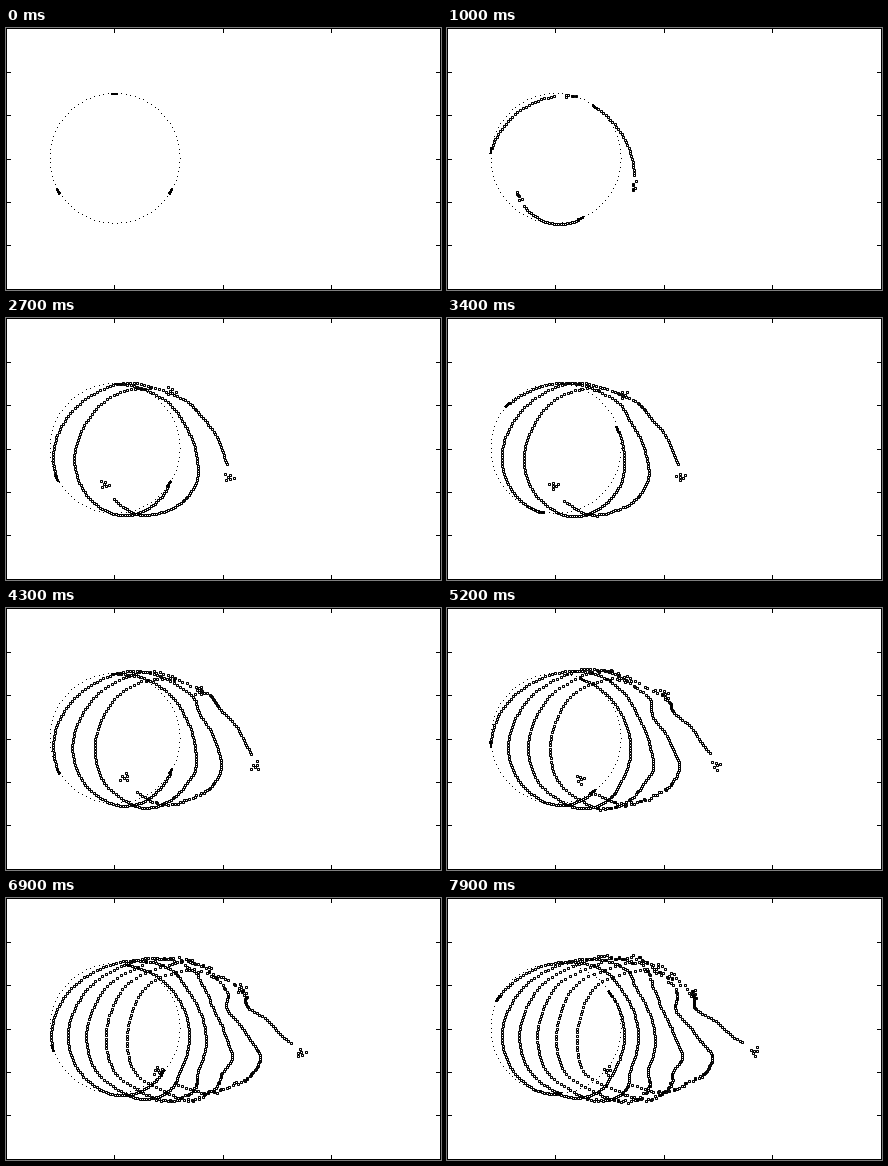
A matplotlib script that plays this animation: 435x262 px, repeating every 8 s.

```python
import numpy as np
import matplotlib.pyplot as plt
from matplotlib.animation import FuncAnimation

W, H, DPI = 435, 262, 80
PX = 72 / DPI                       # one pixel in points
CX, CY, R = 108.5, 130.8, 65
STEP = 2.5                          # degrees of rotation per solver step
FRAMES = 80
STARTS = np.array([330, 90, 210])

# rotor angle reached at a few moments of the loop
KEY_T = [0, 9, 19, 27, 34, 45, 52, 60, 69, 79]
KEY_DEG = [0, 75, 157, 237, 288, 376, 454, 516, 587, 663]
steps = np.rint(np.interp(np.arange(FRAMES), KEY_T, KEY_DEG) / STEP).astype(int)
N = steps[-1]


def bell(v, mid, width):
    return np.exp(-((v - mid) / width) ** 2)


def on_circle(deg):
    a = np.radians(deg)
    return R * np.cos(a), R * np.sin(a)


def velocity(x, y, t):
    """Wake velocity in pixels per degree of rotation."""
    gap = 56 + 0.228 * t - 0.00002 * t * t - x      # distance behind the front
    core = 1 / (1 + np.exp((np.abs(y) - 52) / 5))
    slow = 0.055 * (1 - np.exp(-t / 150))
    slow = slow + 1.1e-7 * t * t * np.clip((x + 65) / 110, 0, 1)
    slow = slow * core * np.clip((gap + 60) / 90, 0, 1)
    slow = slow + 0.025 * bell(x, -62, 10) * bell(y, -5, 35)
    low = bell(gap, 0, 25) * bell(y, -33, 20)
    high = bell(gap, 50, 30) * bell(y, 48, 15)
    hook = bell(gap, 45, 25) * (0.045 * bell(y, -36, 22) - 0.02 * bell(y, 28, 15))
    u = 0.228 - 0.00004 * t - slow + 0.04 * low + 0.05 * high + hook
    v = (0.035 * y / R * bell(x, -10, 60)
         - 0.045 * bell(gap, 45, 45) * (y + 20) / 60
         + 0.015 * low)
    return u, v


rng = np.random.default_rng(4)
shed = np.arange(N)
angle = STARTS[:, None] + STEP * shed
sin0 = np.sin(np.radians(angle))
edge = np.clip((np.abs(sin0) - 0.75) / 0.2, 0, 1) * np.where(sin0 > 0, 2.8, 2)
edge = edge * rng.uniform(0.2, 1, (3, N))
phase = rng.uniform(0, 2 * np.pi, (3, N))


def rolled_up(x, y, n):
    """Scatter the old vortices of the edges and curl up the starting ones."""
    x, y = x[:, :n].copy(), y[:, :n].copy()
    age = STEP * (n - shed[:n])
    amp = edge[:, :n] * np.clip((age - 150) / 200, 0, 1)
    turn = phase[:, :n] + 0.02 * age
    x += amp * np.cos(turn)
    y += amp * np.sin(turn)
    k = min(6, n)
    if k:
        mix = np.clip(age[:k] / 200, 0, 1)
        j = shed[:k]
        rad = 1 + 0.9 * j
        curl = 2.4 * j + 0.012 * STEP * n
        x[:, :k] += mix * (x[:, :1] + rad * np.cos(curl) - x[:, :k])
        y[:, :k] += mix * (y[:, :1] + rad * np.sin(curl) - y[:, :k])
    return CX + x.ravel(), CY - y.ravel()


def solve():
    x, y = on_circle(angle)
    wake = []
    for n in range(N + 1):
        wake.append(rolled_up(x, y, n))
        if n < N:
            u, v = velocity(x[:, :n + 1], y[:, :n + 1], STEP * n)
            x[:, :n + 1] += STEP * u
            y[:, :n + 1] += STEP * v
    return wake


wake = solve()

fig = plt.figure(figsize=(W / DPI, H / DPI), dpi=DPI, facecolor="white")
ax = fig.add_axes([0, 0, 1, 1])
ax.set_xlim(0, W)
ax.set_ylim(H, 0)
ax.axis("off")


def line(xs, ys, width=1):
    return ax.plot(xs, ys, color="black", lw=width * PX, antialiased=False,
                   snap=False, solid_capstyle="butt",
                   solid_joinstyle="miter")[0]


for ey in (0.5, H - 0.5):
    line([0, W], [ey, ey])
for ex in (0.5, W - 0.5):
    line([ex, ex], [0, H])
for tx in (108.5, 217.5, 325.5):
    line([tx, tx], [0, 5])
    line([tx, tx], [H - 5, H])
for ty in (44.5, 87.5, 131.5, 174.5, 217.5):
    line([0, 5], [ty, ty])
    line([W - 5, W], [ty, ty])

cx, cy = on_circle(np.arange(0, 360, 4))
ax.plot(CX + cx, CY - cy, ",", color="black", antialiased=False)

vortices, = ax.plot([], [], "s", ms=2 * PX, mew=PX, mfc="none", mec="black",
                    antialiased=False)
blades = [line([], [], 1.5) for _ in STARTS]


def draw(frame):
    n = steps[frame]
    vortices.set_data(*wake[n])
    for blade, start in zip(blades, STARTS):
        bx, by = on_circle(start + STEP * n + np.array([-2.8, 2.8]))
        blade.set_data(CX + bx, CY - by)
    return [vortices, *blades]


anim = FuncAnimation(fig, draw, frames=FRAMES, interval=100, repeat=True,
                     repeat_delay=0, blit=False)
plt.show()
```
